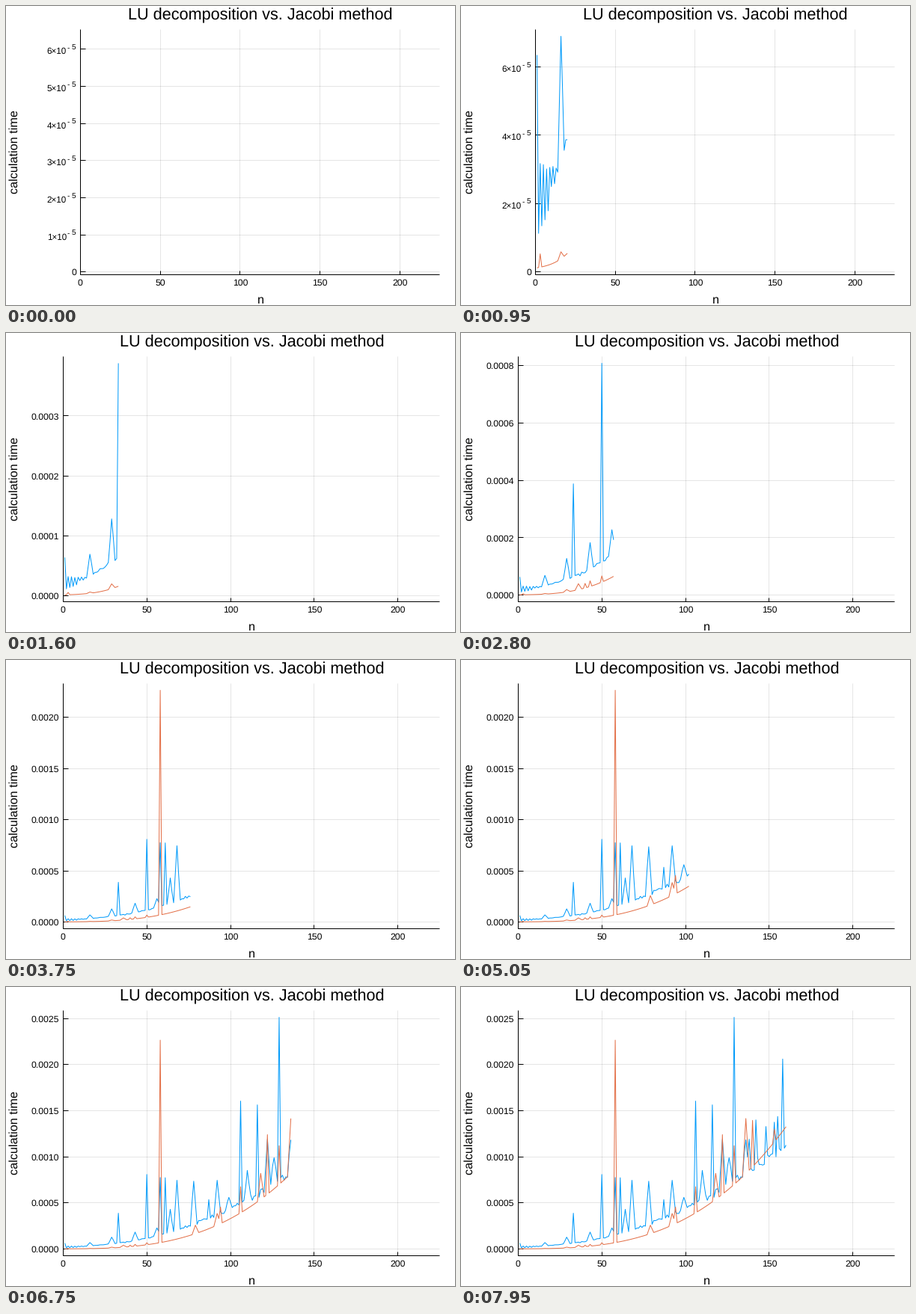
Animation, 600 px wide and 400 px high, one loop 8 s. Source, as a matplotlib script:

```python
import math

import matplotlib.pyplot as plt
import numpy as np
from matplotlib.animation import FuncAnimation

plt.rcParams.update({
    "font.family": "Liberation Sans",
    "text.hinting": "none",
})

W, H, DPI = 600, 400, 100
PX = 72 / DPI                     # points per pixel
COUNT, STEP_MS = 160, 50
TOP, BOTTOM, RIGHT, X_MAX = 31.2, 359.6, 579.8, 225
BLUE, RED = "#009afa", "#e36f47"

# Timings in microseconds: smooth growth plus a few slow runs.
JACOBI_SPIKES = {1: 63.5, 33: 388, 50: 808, 58: 775, 61: 773, 87: 535,
                 106: 1604, 116: 1563, 129: 2513, 138: 1190, 142: 1400,
                 148: 1328, 153: 1375, 155: 1437, 158: 2060}
JACOBI_HUMPS = {16: 69, 29: 128, 43: 183, 56: 228, 64: 430, 68: 745, 78: 735,
                92: 745, 99: 560, 110: 852, 122: 1190, 126: 990, 136: 1183}
LU_SPIKES = {3: 5.2, 40: 41, 43: 50, 50: 67, 58: 2265, 94: 455, 106: 675,
             122: 1240, 129: 1120, 140: 1395, 153: 1300}
LU_HUMPS = {16: 5.8, 29: 19.5, 36: 40, 79: 258, 92: 385, 118: 820, 136: 1415}

N = np.arange(1, COUNT + 1)


def with_peaks(base, spikes, humps):
    """Spikes last one run; humps also raise their neighbours halfway."""
    values = base.copy()
    for peaks, width in ((humps, 2), (spikes, 1)):
        for n, top in peaks.items():
            shape = np.clip(1 - abs(N - n) / width, 0, 1)
            values = np.maximum(values, base + shape * (top - base[n - 1]))
    return values


rng = np.random.default_rng(3)
zigzag = 9 * np.where(N % 2, 1, -1) * np.exp(-(N / 11) ** 4)
growth = 0.0445 * N**2 + 22 * np.exp(-(N / 45) ** 4)
jacobi = with_peaks(growth * rng.normal(1, 0.035, COUNT) + zigzag,
                    JACOBI_SPIKES, JACOBI_HUMPS)
lu = with_peaks(0.00032 * N**3 + 0.09 * N + 1, LU_SPIKES, LU_HUMPS)


def nice_ticks(lo, hi):
    """Pick 4 to 8 round ticks, weighing count, coverage and step."""
    best, chosen = -math.inf, []
    for power in (1, 10, 100, 1000):
        for q, nice in ((1, 1), (5, 0.9), (2.5, 0.5), (2, 0.7), (3, 0.2)):
            step = q * power
            first, last = math.ceil(lo / step), math.floor(hi / step)
            k = last - first + 1
            if not 4 <= k <= 8:
                continue
            cover = 1.5 * (hi - lo) / ((k - 1) * step)
            score = (1 - abs(k - 5) / 5) / 4 + cover / 3 + nice / 4
            if score > best + 1e-9:
                best = score
                chosen = [i * step for i in range(first, last + 1)]
    return chosen


def decimals(step):
    d = 6
    while step % 10 ** (7 - d) == 0:
        d -= 1
    return d


fig = plt.figure(figsize=(W / DPI, H / DPI), dpi=DPI, facecolor="white")
ax = fig.add_axes([0, 0, 1, 1])
ax.set(xlim=(0, W), ylim=(H, 0))
ax.axis("off")


def line(xs, ys, color="black", alpha=1.0, z=2):
    ax.plot(xs, ys, color=color, alpha=alpha, lw=PX, zorder=z,
            solid_capstyle="butt")


def rule(x0, y0, x1, y1, **kw):
    # Half a pixel back, so that snapping lands on the pixel holding the point.
    line([x0 - 0.5, x1 - 0.5], [y0 - 0.5, y1 - 0.5], **kw)


def text(x, y, s, size, ha="center", **kw):
    ax.text(x, y, s, fontsize=size * PX, ha=ha, va="baseline", **kw)


def power_label(left, y, v):
    if v == 0:
        text(left - 5, y + 4.5, "0", 12.3, "right")
        return
    text(left - 44.5, y + 6.5, f"{v / 10:.0f}×10", 11.6, "left")
    text(left - 17.5, y, "-", 10, "left")
    text(left - 6, y, "5", 10, "right")


def draw(frame):
    for artist in list(ax.lines) + list(ax.texts):
        artist.remove()

    n = frame + 1
    both = np.concatenate([jacobi[:n], lu[:n]])
    pad = 0.03 * np.ptp(both)
    lo, hi = both.min() - pad, both.max() + pad
    ticks = nice_ticks(lo, hi)
    scientific = ticks[-1] - ticks[0] < 100
    digits = decimals(ticks[1] - ticks[0])
    left = 99.4 if scientific else 41.3 + 7 * (digits + 1)

    def px(x):
        return left + x * (RIGHT - left) / X_MAX

    def py(v):
        return BOTTOM - (v - lo) * (BOTTOM - TOP) / (hi - lo)

    for x in range(0, 201, 50):
        rule(px(x), TOP, px(x), BOTTOM, alpha=0.1, z=1)
        rule(px(x), BOTTOM - 5, px(x), BOTTOM)
        text(px(x), 374, str(x), 12.3)
    for v in ticks:
        y = py(v)
        rule(left, y, RIGHT, y, alpha=0.1, z=1)
        rule(left, y, left + 7, y)
        if scientific:
            power_label(left, y, v)
        else:
            text(left - 5, y + 4.5, f"{v * 1e-6:.{digits}f}", 12.3, "right")
    rule(left, TOP, left, BOTTOM)
    rule(left, BOTTOM, RIGHT, BOTTOM)

    if n > 1:
        line(px(N[:n]), py(jacobi[:n]), BLUE, z=3)
        line(px(N[:n]), py(lu[:n]), RED, z=4)

    mid = (left + RIGHT) / 2 + 0.5
    text(mid, 18, "LU decomposition vs. Jacobi method", 21.7)
    text(mid, 398, "n", 16.2)
    text(15.5, 195.5, "calculation time", 16.2, rotation=90,
         rotation_mode="anchor")
    return []


anim = FuncAnimation(fig, draw, frames=COUNT, interval=STEP_MS,
                     init_func=lambda: draw(0), repeat=True, repeat_delay=0,
                     blit=False)
plt.show()
```
